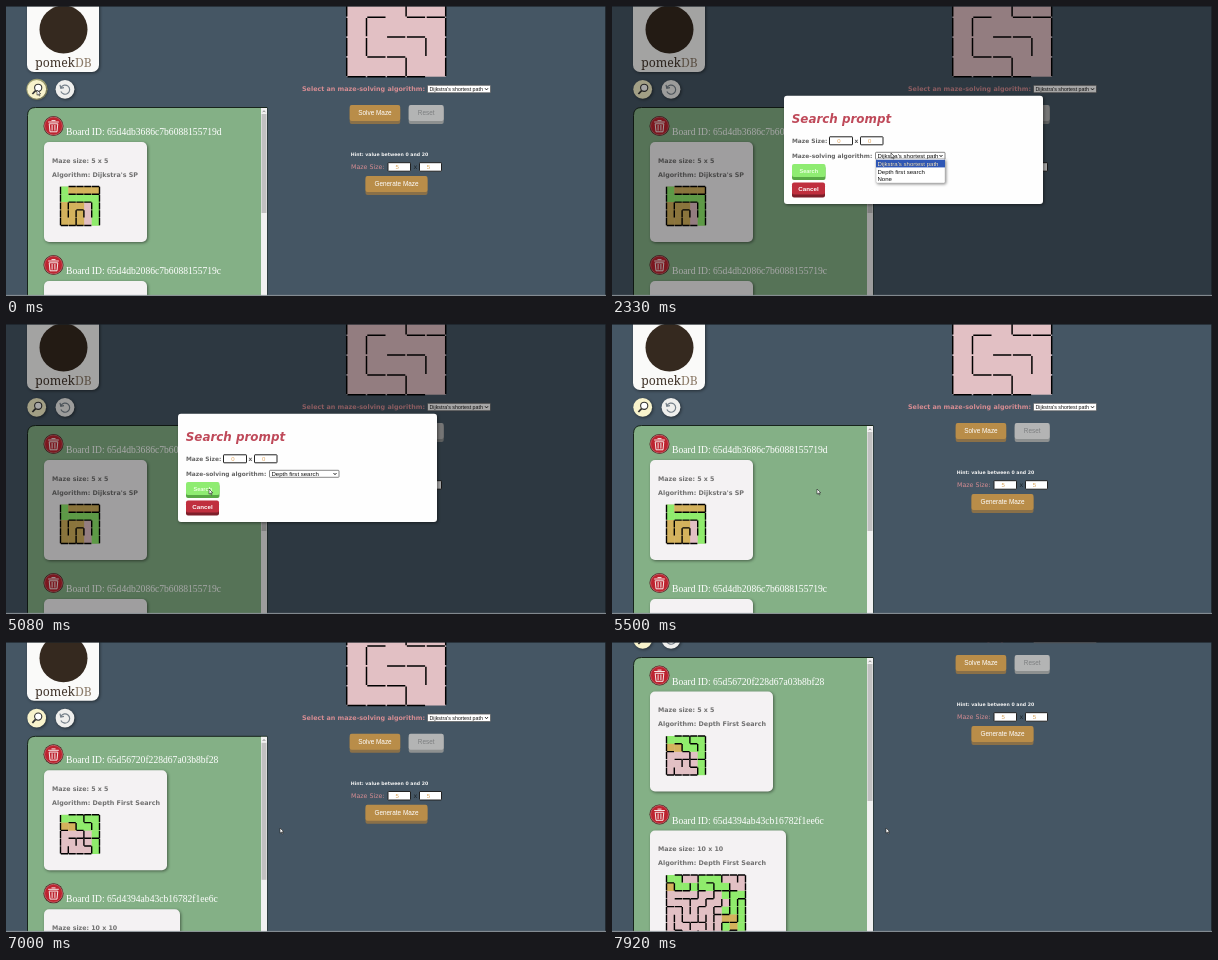
Recreate the animation shown at these times as an HTML page. Size 600 px wide and 290 px high, loop 8000 ms.

```html
<!DOCTYPE html>
<html>
<head>
<meta charset="utf-8">
<style>
  html, body { margin: 0; overflow: hidden; background: #455664; }
  svg { display: block; }
  .ui { font-family: "DejaVu Sans", sans-serif; font-size: 6.4px; }
  .arial { font-family: "Liberation Sans", sans-serif; font-size: 5.3px; }
  .serif { font-family: "Liberation Serif", serif; font-size: 9.6px; }
  .logo { font-family: "Noto Serif", serif; font-size: 12.2px; }
  .bold { font-weight: bold; }
  .italic { font-style: italic; }
  .mid { text-anchor: middle; }
  .card { filter: drop-shadow(1px 1.5px 1.5px #0007); }
</style>
</head>
<body>
<svg id="stage" width="600" height="290" viewBox="0 0 600 290"></svg>
<script>
const LOOP = 8000;
const PINK = '#e2c0c4', GREEN = '#8fec6c', TAN = '#d4b25c';

const rect = (x, y, w, h, fill, r = 0, extra = '') =>
  `<rect x="${x}" y="${y}" width="${w}" height="${h}" rx="${r}" fill="${fill}" ${extra}/>`;
const circle = (x, y, r, fill, extra = '') =>
  `<circle cx="${x}" cy="${y}" r="${r}" fill="${fill}" ${extra}/>`;
const line = (d, color, width, extra = '') =>
  `<path d="${d}" fill="none" stroke="${color}" stroke-width="${width}" ${extra}/>`;
const text = (x, y, str, fill, cls, size) =>
  `<text x="${x}" y="${y}" fill="${fill}" class="${cls}"${size ? ` style="font-size:${size}px"` : ''}>${str}</text>`;
const group = (id, body) => `<g id="${id}">${body}</g>`;

// Raised button with a darker lower lip
const button = (x, y, w, h, fill, lip, label, color, cls = 'arial mid', size = 6.4) =>
  rect(x, y + 2, w, h - 1, lip, 2) + rect(x, y, w, h - 2, fill, 2) +
  text(x + w / 2, y + h / 2 + 1.3, label, color, cls, size);

const field = (x, y, w, h, value, color) =>
  rect(x, y, w, h, '#fff', 0.5, 'stroke="#222"') +
  text(x + w / 2 - 2, y + h / 2 + 2.2, value, color, 'arial mid', 6);

const select = (x, y, w, h, label, size) =>
  rect(x, y, w, h, '#fff', 0.8, 'stroke="#555" stroke-width=".7"') +
  text(x + 2, y + h / 2 + size * 0.35, label, '#111', 'arial', size) +
  line(`M${x + w - 5.5} ${y + h / 2 - 0.8}l1.5 1.7l1.5-1.7`, '#111', 0.9);

// Maze in cell units: open at the top left and the bottom right
function maze(x, y, cell, n, walls, thick, colors = []) {
  const fills = { g: GREEN, t: TAN };
  let cells = rect(0, 0, n, n, PINK);
  colors.forEach((row, j) => [...row].forEach((c, i) => {
    if (fills[c]) cells += rect(i, j, 1.03, 1.03, fills[c]);
  }));
  const border = `M1 0H${n}V${n}M0 0V${n}H${n - 1}`;
  return `<g transform="translate(${x} ${y}) scale(${cell})">${cells}` +
    line(border + walls, '#000', thick, 'stroke-dasharray=".92 .08" stroke-dashoffset="-.04"') + '</g>';
}

function randomWalls(n, seed) {
  const random = () => (seed = seed * 16807 % 2147483647) / 2147483647;
  const seen = new Set([0]), open = new Set();
  const visit = (x, y) => {
    const steps = [[1, 0], [-1, 0], [0, 1], [0, -1]]
      .map(s => [random(), s]).sort((a, b) => a[0] - b[0]);
    for (const [, [dx, dy]] of steps) {
      const u = x + dx, v = y + dy;
      if (u < 0 || v < 0 || u >= n || v >= n || seen.has(v * n + u)) continue;
      seen.add(v * n + u);
      open.add(`${x + u},${y + v}`);
      visit(u, v);
    }
  };
  visit(0, 0);
  let d = '';
  for (let y = 0; y < n; y++) for (let x = 0; x < n; x++) {
    if (x < n - 1 && !open.has(`${2 * x + 1},${2 * y}`)) d += `M${x + 1} ${y}v1`;
    if (y < n - 1 && !open.has(`${2 * x},${2 * y + 1}`)) d += `M${x} ${y + 1}h1`;
  }
  return d;
}

const trash = (x, y) =>
  circle(x, y, 10, '#4d1a1e') + circle(x, y, 9, '#bd2430', 'stroke="#d98a8c" stroke-width=".6"') +
  line(`M${x - 5.3} ${y - 4}h10.6M${x - 2} ${y - 5.4}h4M${x - 4.3} ${y - 2.2}l.8 8h7l.8-8z` +
    `M${x - 1.4} ${y - 1}v5.6M${x + 1.4} ${y - 1}v5.6`, '#f6e6e6', 1);

// One saved board; y is the centre of its delete button
const board = (y, id, n, algorithm, width, walls, colors) =>
  trash(47.5, y) +
  text(60, y + 9, 'Board ID: ' + id, '#fff', 'serif') +
  rect(38, y + 16, width, 60 + 8 * n, '#f4f2f3', 5, 'class="card"') +
  text(46, y + 36.5, `Maze size: ${n} x ${n}`, '#707070', 'ui bold', 6.3) +
  text(46, y + 50.5, 'Algorithm: ' + algorithm, '#707070', 'ui bold') +
  maze(54.5, y + 60.5, 8 - 1 / n, n, walls, 0.18, colors);

const spiral = 'M1 1H5M1 2H4V4M1 2V4M2 5V3H3V4';
const spiralColors = ['gtttt', 'ggggg', 'tttpg', 'tttpg', 'tttpg'];

const oldList =
  board(120, '65d4db3686c7b6088155719d', 5, "Dijkstra's SP", 103, spiral, spiralColors) +
  board(259, '65d4db2086c7b6088155719c', 5, "Dijkstra's SP", 103, spiral, spiralColors);

const newList =
  board(119.5, '65d56720f228d67a03b8bf28', 5, 'Depth First Search', 123,
    'M1 1H2V2H3M3 0V1H4V2M0 2H1M3 2V3H5M1 3H3V4H4V5M2 3V4M1 4V5',
    ['ggggg', 'ttggg', 'ppppg', 'ppppg', 'ppppg']) +
  board(258.5, '65d4394ab43cb16782f1ee6c', 10, 'Depth First Search', 136, randomWalls(10, 4711),
    ['ggppgggppp', 'tgggggggpp', 'pppppppggg', 'ppppppppgg', 'pppppppggg', 'pppppppttg', 'pppppppgtg', 'pppppppggg']);

const thumb = (id, h) => group(id, rect(255.5, 108, 5, h, '#c1c1c1'));

const page =
  rect(21, -60, 72, 126, '#fafaf9', 7, 'class="card"') +
  circle(57.5, 23.5, 24, '#35291f') +
  `<text x="57.5" y="61.3" class="logo mid" fill="#42352b">pomek<tspan fill="#8b7a68">DB</tspan></text>` +
  group('glow', circle(31, 83.3, 10.6, '#f0e68a', 'opacity=".6"')) +
  circle(30.7, 83.3, 9.4, '#f8f3cc', 'class="card"') +
  circle(32.2, 81.8, 3.6, '#fff', 'stroke="#333" stroke-width="1.1"') + line('M29.6 84.6L26.4 88', '#333', 1.7) +
  circle(59, 83.3, 9.4, '#efefed', 'class="card"') +
  line('M55 81.5A4.6 4.6 0 1 1 54.9 85.6M54 78.8L54.8 82.2L58 81.6', '#75808a', 1.2) +
  `<path d="M21.5 420V109.5q0-8 8-8H261V420z" fill="#84b086" stroke="#17241b"/>` +
  group('old', oldList) + group('new', newList) +
  rect(255, 102, 6, 320, '#f1f1f1') + line('M256.7 106.2l1.3-1.5l1.3 1.5', '#777', 0.8) +
  thumb('oldThumb', 99) + thumb('newThumb', 137) +
  maze(340.7, -28.3, 19.8, 5, 'M1 2H2M1 2V4H3V5M2 3H4V4M3 1V2H5', 0.075) +
  text(296, 85.2, 'Select an maze-solving algorithm:', '#d58c92', 'ui bold') +
  select(421.5, 79.3, 63, 7.5, "Dijkstra's shortest path", 5.3) +
  button(343.7, 99, 50.5, 18, '#b98d49', '#8a7048', 'Solve Maze', '#fff') +
  button(402.7, 99, 35, 18, '#b3b4b4', '#8d9090', 'Reset', '#7d7f80') +
  text(344.8, 150.4, 'Hint: value between 0 and 20', '#f2f2f2', 'ui bold', 4.67) +
  text(345, 163, 'Maze Size:', '#d58c92', 'ui', 6.3) +
  field(382, 156.7, 22.5, 8.5, 5, '#d6a155') + text(409.3, 163, 'x', '#1d2429', 'ui mid') +
  field(413.5, 156.7, 22, 8.5, 5, '#d6a155') +
  button(359.5, 170, 62, 18, '#b98d49', '#8a7048', 'Generate Maze', '#fff');

const option = (y, label, color) => text(265.5, y, label, color, 'arial', 6.05);
const dropdown =
  rect(264, 153, 69, 24, '#fff', 1.5, 'stroke="#bbb" stroke-width=".5" class="card"') +
  group('marker', rect(264, 153.8, 69, 7.6, '#2f57b5')) +
  option(159.8, "Dijkstra's shortest path", '#111') + option(167.5, 'Depth first search', '#111') +
  option(175.2, 'None', '#111') +
  group('white0', option(159.8, "Dijkstra's shortest path", '#fff')) +
  group('white1', option(167.5, 'Depth first search', '#fff'));

const modal =
  rect(0, 0, 600, 290, '#000', 0, 'opacity=".35"') +
  rect(172, 89.7, 259, 108.3, '#fefefe', 3, 'class="card"') +
  text(179.8, 116.8, 'Search prompt', '#bf4a5a', 'ui bold italic', 11.9) +
  text(180, 137, 'Maze Size:', '#666', 'ui bold', 5.9) +
  field(217.5, 130.8, 23, 8, 0, '#e0a35a') + text(244.3, 137, 'x', '#555', 'ui bold mid', 5.9) +
  field(248.5, 130.8, 22.5, 8, 0, '#e0a35a') +
  text(180, 152, 'Maze-solving algorithm:', '#666', 'ui bold', 5.9) +
  group('pick0', select(263.5, 146.3, 69.5, 7, "Dijkstra's shortest path", 6.05)) +
  group('pick1', select(263.5, 146.3, 69.5, 7, 'Depth first search', 6.05)) +
  button(180, 158, 33.5, 15, '#8fec72', '#58a845', 'Search', '#eaffdf', 'arial bold mid', 5.6) +
  button(180, 176.5, 33, 14, '#c02f3e', '#7d1f2a', 'Cancel', '#fff', 'arial bold mid', 6.2) +
  group('dropdown', dropdown);

document.getElementById('stage').innerHTML =
  rect(0, 0, 600, 290, '#455664') + group('page', page) + group('modal', modal) +
  line('M0 .3H600M599.5 0V290', '#1b2126', 0.8) + line('M0 289.4H600', '#8b9298', 1) +
  group('cursor', '<path d="M0 0V5.2L1.3 4.1L2.2 6L3 5.6L2.2 3.8H3.8z" fill="#fff" stroke="#222" stroke-width=".6"/>');

const part = id => document.getElementById(id);
const show = (id, visible) => part(id).setAttribute('visibility', visible ? 'inherit' : 'hidden');
const move = (id, x, y) => part(id).setAttribute('transform', `translate(${x} ${y})`);

// Linear value between [time, ...values] keys
function along(keys, t) {
  const i = keys.findIndex(k => k[0] > t);
  if (i < 0) return keys[keys.length - 1].slice(1);
  if (i === 0) return keys[0].slice(1);
  const a = keys[i - 1], b = keys[i], f = (t - a[0]) / (b[0] - a[0]);
  return a.slice(1).map((v, j) => v + (b[j + 1] - v) * f);
}

const cursorPath = [
  [0, 31, 84], [900, 31, 84], [1330, 70, 100], [2080, 279, 147], [2750, 279, 147], [3400, 284, 164],
  [3830, 285, 165], [4080, 287.5, 168], [4330, 287.5, 168], [5080, 203, 165], [5500, 205, 165],
  [5750, 205, 165], [6500, 274, 186]
];
const scrollPath = [[6980, 0], [7000, 7], [7170, 40], [7420, 75.2], [7750, 84], [7920, 86]];

function draw(now) {
  const t = now % LOOP;
  const [scroll] = along(scrollPath, t);
  move('page', 0, -scroll);
  move('cursor', ...along(cursorPath, t));

  const found = t >= 5750;
  show('old', !found);
  show('oldThumb', !found);
  show('new', found);
  show('newThumb', found);
  show('glow', t < 500);

  show('modal', t >= 500 && t < 5330);
  part('modal').setAttribute('opacity', Math.min(1, Math.max(0, (t - 450) / 250)));
  const second = t >= 3170, chosen = t >= 3830;
  show('dropdown', t >= 2170 && !chosen);
  move('marker', 0, second ? 7.7 : 0);
  show('white0', !second);
  show('white1', second);
  show('pick0', !chosen);
  show('pick1', chosen);
  requestAnimationFrame(draw);
}
requestAnimationFrame(draw);
</script>
</body>
</html>
```
